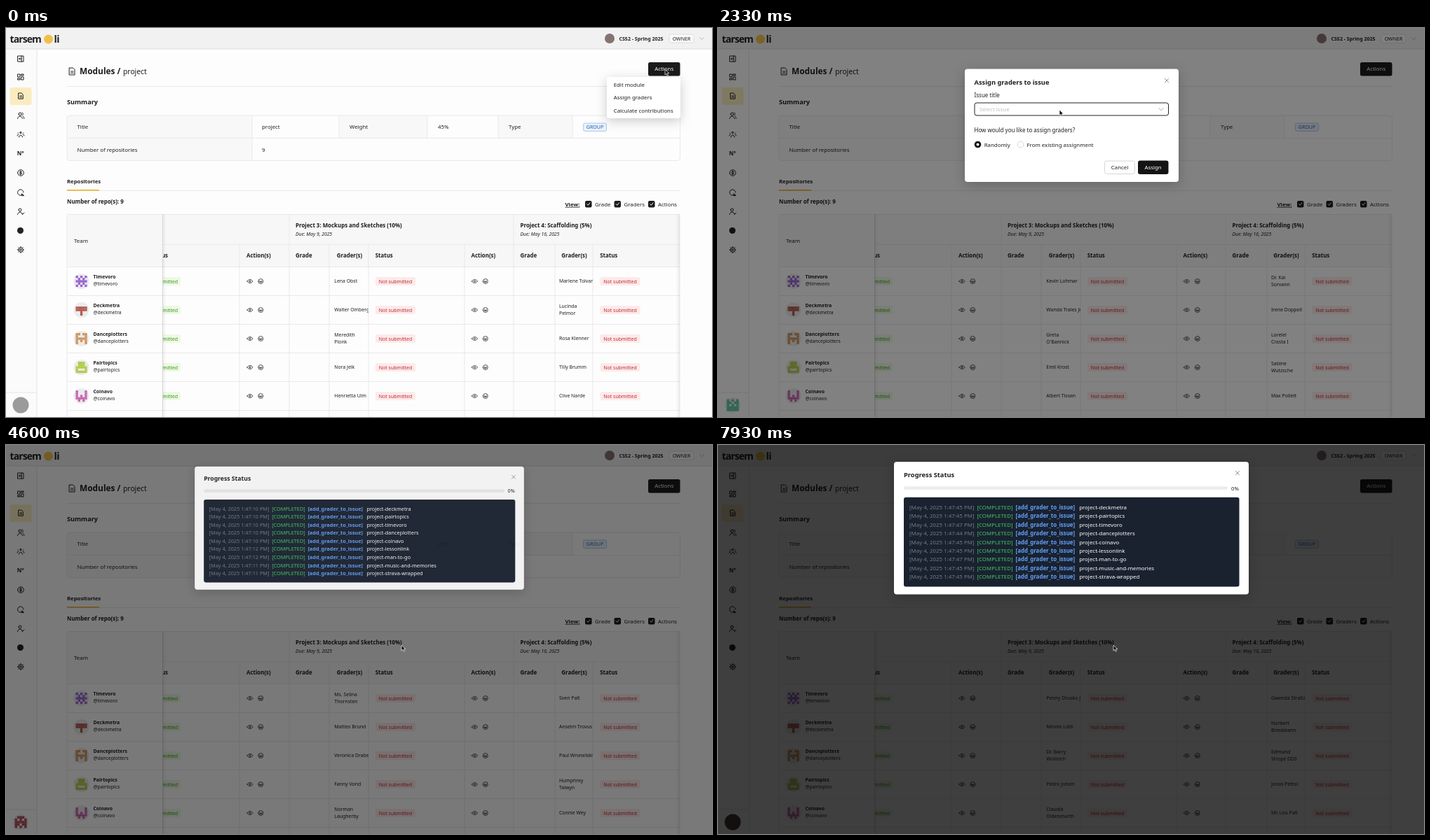
Animation of 1007x556 px, one loop 8000 ms. Source, as an HTML page:

```html
<!DOCTYPE html>
<html lang="en">
<head>
<meta charset="utf-8">
<title>Assign graders</title>
<style>
html, body { margin: 0; height: 100%; overflow: hidden; background: #fdfdfd; }
svg { display: block; width: 100vw; height: 100vh; font-family: "Noto Sans", "Open Sans", sans-serif; }
text { white-space: pre; }
.icon { fill: none; stroke: #1c1c1c; stroke-width: 1; stroke-linecap: round; stroke-linejoin: round; }
.thin .icon { stroke-width: .75; }
.card { filter: drop-shadow(0 4px 8px rgba(0,0,0,.2)); }
</style>
</head>
<body>
<svg id="stage" viewBox="0 0 1007 556"></svg>
<script>
const LOOP = 8000, INK = '#1f1f1f', LINE = '#e9e9e9';
const teams = [
  ['Timevoro', '#9a62d2', '52725'], ['Deckmetra', '#b4584f', '07711'],
  ['Danceplotters', '#d0955f', '64754'], ['Pairtopics', '#b1cd4b', '33747'],
  ['Coinavo', '#c964b4', '44572']
];
// Each set: five names for the left column, then five for the right one.
const nameSets = [
  [0, 'Lena Obst,Walter Omberg,Meredith|Plonk,Nora Jelk,Henrietta Ulm,Marlene Tolvar,Lucinda|Pelmor,Rosa Klenner,Tilly Brumm,Clive Narde'],
  [930, "Kevin Lohmar,Wanda Trales Jr.,Greta|O'Bannick,Emil Krost,Albert Tissen,Dr. Kai|Sorvann,Irene Doppell,Lorelei|Crasta I,Sabine|Wutzsche,Max Pollett"],
  [3530, 'Desmond|Hullings,Selina Doza|IV,Otto Ulmer,Yvonne Tavert,Ruby Hosper,Hugo Vayen,Jane Druhl,Victor Pelvin,Ursula Tovan,Gilbert|Lommer'],
  [4330, 'Ms. Selina|Thornsten,Matteo Brund,Veronica Drabey,Fanny Vond,Norman|Laugherby,Sven Palt,Anselm Trovus,Paul Wronelski,Humphrey|Talwyn,Connie Wey'],
  [4930, 'Penny Drusko Jr.,Minnie Lotti,Dr. Barry|Wolinich,Pedro Jolsen,Claudia|Oldenmarth,Gwenda Straltz,Norbert|Briedelann,Edmund|Strope DDS,Jonas Pettol,Mr. Lou Palt']
];
const avatars = [[0, '#9b9b9b'], [930, '#7fc98a', '37757'], [2130, '#5fc3a4', '56577'],
  [3530, '#5a78c8', '25725'], [4330, '#b0505c', '35765'], [4930, '#4a3d3c']];
// project, earlier second, start second, final second, finish time
const jobs = [
  ['deckmetra', 10, 44, 45, 5400], ['pairtopics', 10, 44, 45, 5870], ['timevoro', 10, 43, 47, 6670],
  ['danceplotters', 10, 44, 44, 5130], ['coinavo', 10, 44, 45, 5870], ['lessonlink', 12, 44, 45, 5600],
  ['man-to-go', 12, 44, 47, 6670], ['music-and-memories', 11, 44, 45, 5530], ['strava-wrapped', 11, 44, 45, 5670]
];
const rowY = i => 362 + 41 * i;

const text = (x, y, s, size = 7.85, weight = 400, more = '') =>
  `<text x="${x}" y="${y}" dy=".36em" font-size="${size}" font-weight="${weight}" fill="${INK}" ${more}>${s}</text>`;
const rect = (x, y, w, h, fill, more = '') =>
  `<rect x="${x}" y="${y}" width="${w}" height="${h}" fill="${fill}" ${more}/>`;
const hline = (x1, x2, y, c = LINE) => rect(x1, y - .5, x2 - x1, 1, c);
const vline = (x, y1, y2, c = LINE) => rect(x - .5, y1, 1, y2 - y1, c);
const icon = (x, y, d, more = '') => `<path class="icon" transform="translate(${x} ${y})" d="${d}" ${more}/>`;
const circle = (x, y, r, fill) => `<circle cx="${x}" cy="${y}" r="${r}" fill="${fill}"/>`;
const ring = r => `M${-r} 0a${r} ${r} 0 1 0 ${2 * r} 0a${r} ${r} 0 1 0 ${-2 * r} 0`;
const mid = 'text-anchor="middle"';

// Mirrored 5 by 5 pattern; each octal digit holds the left three cells of a row.
function identicon(x, y, color, rows, cell = 3.2) {
  let out = circle(x, y, 11, '#ebebeb');
  [...rows].forEach((d, r) => {
    for (let c = 0; c < 5; c++)
      if (d >> (2 - Math.min(c, 4 - c)) & 1)
        out += rect(x + (c - 2.5) * cell, y + (r - 2.5) * cell, cell + .1, cell + .1, color);
  });
  return out;
}

const doc = 'M-3.5 -5H1.5L4 -2.5V5H-3.5ZM-1.5 0H2M-1.5 2.3H2';
const person = 'M-4.5 4.5C-4 0 2 0 2.5 4.5M-3 -2a2 2 0 1 0 4 0a2 2 0 1 0 -4 0';

function frame() {
  let s = rect(0, 0, 1007, 556, '#fdfdfd') + rect(0, 31, 44, 525, '#fbfbfb') + vline(44, 30, 556, '#e4e4e4')
    + rect(0, 0, 1007, 30, '#f1f1f1') + hline(0, 1007, 30, '#dedede');
  s += text(5.5, 15.5, 'tarsem', 14, 900, 'letter-spacing="-.9"') + circle(60.5, 16, 6.5, '#f0c04a')
    + text(68.5, 15.5, 'li', 14, 900, 'letter-spacing="-.6"');
  s += circle(861, 15, 7, '#85736f') + text(874.5, 15, 'CS52 - Spring 2025', 7.05, 600)
    + rect(946, 9, 35, 12, '#fafafa', 'rx="2" stroke="#d6d6d6" stroke-width=".8"')
    + text(963.5, 15, 'OWNER', 7.05, 400, mid) + icon(992.5, 15, 'M-3 -1.5L0 1.8L3 -1.5', 'style="stroke:#bbb"');
  // sidebar
  s += rect(5.5, 85, 31, 25, '#faecc0', 'rx="3"');
  s += icon(21, 44, 'M-4 -4H4V4H-4ZM1.2 -4V4M-2.4 0H.6M-1 -1.4L-2.4 0L-1 1.4')
    + icon(21, 70, 'M-4 -4H-1V0H-4ZM1 -4H4V-2H1ZM1 0H4V4H1ZM-4 2H-1V4H-4Z')
    + icon(21, 97, 'M-3 -4H1L3.3 -1.7V4.2H-3ZM-1.3 0H1.6M-1.3 2H1.6')
    + icon(21, 125, person + 'M2 -4C4 -3.5 4 -.8 2 -.3M3 1C4.3 1.5 4.8 3 4.8 4.5')
    + icon(21, 152, 'M-1.2 -2.5a1.2 1.2 0 1 0 2.4 0a1.2 1.2 0 1 0 -2.4 0M-2.5 4C-2 0 2 0 2.5 4M-4.8 2C-4.8 .5 -4 0 -3 0M4.8 2C4.8 .5 4 0 3 0M-4 -2.2V-1.8M4 -2.2V-1.8')
    + text(20.5, 179.5, 'Nº', 8, 800, mid)
    + icon(21, 207, ring(4.3) + 'M1.6 -1.4C.5 -2.6 -1.8 -2 -1.5 -.8C-1.2 .4 1.6 -.2 1.6 1.2C1.5 2.4 -.7 2.5 -1.7 1.4M0 -2.8V2.8')
    + icon(21, 235, 'M3 2.8A4.2 4.2 0 1 1 4 0M4.3 4.3L1.3 1.8V4.3Z')
    + icon(21, 262, person + 'M1.6 3.2L2.8 4.4L4.8 2') + circle(20.5, 289.5, 4.5, '#222')
    + icon(21, 317, ring(3.3) + ring(1.3) + 'M0 -4.6V-3.4M0 3.4V4.6M-4.6 0H-3.4M3.4 0H4.6M-3.2 -3.2L-2.4 -2.4M3.2 3.2L2.4 2.4M3.2 -3.2L2.4 -2.4M-3.2 3.2L-2.4 2.4')
    + hline(0, 44, 521, '#e6e6e6');
  // title and summary
  s += icon(94, 62, doc) + text(105, 62, 'Modules /', 11.9, 600) + text(167, 62, 'project', 10.3)
    + hline(87, 961, 83.5) + rect(916, 49, 45.5, 19.5, '#1b1b1b', 'rx="2.5"')
    + text(938.7, 58.5, 'Actions', 7.85, 400, mid + ' style="fill:#fff"') + text(87, 106, 'Summary', 9.2, 600);
  for (const [x, y, w] of [[87, 125, 264], [475, 125, 126], [702, 125, 106], [87, 157, 264]]) s += rect(x, y, w, 32, '#f8f8f8');
  s += rect(87, 125, 874.5, 64.5, 'none', `rx="4" stroke="${LINE}"`) + hline(87, 961, 157.5) + vline(351, 125, 189);
  for (const x of [475, 601, 702, 808]) s += vline(x, 125, 157);
  s += text(101.5, 141.5, 'Title') + text(365, 141.5, 'project', 7.85, 500) + text(490, 141.5, 'Weight')
    + text(616, 141.5, '45%', 7.85, 500) + text(717, 141.5, 'Type') + text(101.5, 174, 'Number of repositories')
    + text(365, 174, '9', 7.85, 500) + rect(823.5, 136, 33, 11.5, '#e8f1fc', 'rx="2" stroke="#a3bfe0" stroke-width=".8"')
    + text(840, 141.7, 'GROUP', 7.05, 500, mid + ' style="fill:#2c62ab"');
  // tab and view switches
  s += text(87, 219, 'Repositories', 7.75, 600) + hline(87, 961, 232.5) + rect(87, 231, 46, 1.6, '#ecb22e')
    + text(87, 248, 'Number of repo(s): 9', 7.9, 600)
    + text(797.5, 252, 'View:', 7.85, 600, 'text-decoration="underline"');
  for (const [x, label] of [[826, 'Grade'], [867.5, 'Graders'], [916, 'Actions']])
    s += rect(x, 247, 9.5, 9.5, '#1b1b1b', 'rx="2"')
      + icon(x + 4.7, 251.7, 'M-2 0L-.5 1.6L2.2 -1.8', 'style="stroke:#fff"') + text(x + 14, 252, label);
  // table
  s += rect(87, 266, 874, 75, '#f7f7f7', 'rx="4"') + hline(224, 961, 309.5) + hline(87, 961, 266.5)
    + vline(87, 268, 556) + vline(961, 268, 556);
  for (let i = 0; i < 6; i++) s += hline(87, 961, 341.5 + 41 * i);
  for (const x of [404, 724]) s += vline(x, 266, 556);
  for (const x of [333, 461, 517, 654, 783, 837]) s += vline(x, 309, 556);
  s += text(97, 304, 'Team', 7.85, 500);
  for (const [x, title, due] of [[413, 'Project 3: Mockups and Sketches (10%)', 'May 9'], [733.5, 'Project 4: Scaffolding (5%)', 'May 16']])
    s += text(x, 282, title, 7.9, 600) + text(x, 295, `Due: ${due}, 2025`, 6.8, 500, 'font-style="italic"')
      + text(x, 325.5, 'Grade', 7.9, 600) + text(x + 58.8, 325.5, 'Grader(s)', 7.9, 600) + text(x + 113.7, 325.5, 'Status', 7.9, 600);
  s += text(343, 325.5, 'Action(s)', 7.9, 600) + text(663.5, 325.5, 'Action(s)', 7.9, 600);
  let cut = text(231, 325.5, 'Status', 7.9, 600, 'text-anchor="end"');
  let actions = '';
  teams.forEach(([name, color, rows], i) => {
    const y = rowY(i);
    s += identicon(107.5, y, color, rows) + text(124.5, y - 6, name, 6.85, 600) + text(124.5, y + 4, '@' + name.toLowerCase(), 6.8);
    cut += rect(205, y - 6, 44, 12, '#edf9e3', 'rx="2"') + text(245, y, 'Submitted', 7, 400, 'text-anchor="end" style="fill:#3d9420"');
    for (const x of [527, 847.5])
      s += rect(x, y - 6, 57, 12, '#fdeaea', 'rx="2"') + text(x + 28.5, y, 'Not submitted', 7, 400, mid + ' style="fill:#c02a36"');
    for (const x of [348, 668.5])
      actions += icon(x, y, 'M-4 0C-2 -3.4 2 -3.4 4 0C2 3.4 -2 3.4 -4 0Z' + ring(1.2))
        + icon(x + 15.3, y, ring(3.5) + 'M-1.8 .8C-1 2.2 1 2.2 1.8 .8ZM-1.3 -1V-.8M1.3 -1V-.8');
  });
  s += `<g class="thin">${actions}</g><g clip-path="url(#scrolled)">${cut}</g><g id="names"></g>`
    + rect(223, 266, 6, 290, 'url(#edge)') + rect(-961, 266, 6, 290, 'url(#edge)', 'transform="scale(-1 1)"') + vline(223.5, 266, 556, '#d4d4d4');
  return s;
}

const closeX = (x, y) => icon(x, y, 'M-2.6 -2.6L2.6 2.6M2.6 -2.6L-2.6 2.6', 'style="stroke:#888;stroke-width:.9"');
const menu = rect(857, 70, 105, 59, '#fff', 'rx="4" class="card"')
  + ['Edit module', 'Assign graders', 'Calculate contributions'].map((s, i) => text(866.7, 81 + 18.4 * i, s)).join('');
const form = rect(352, 58.5, 305, 161.5, '#fff', 'rx="4" class="card"') + closeX(640, 75)
  + text(365.5, 77.5, 'Assign graders to issue', 9.3, 600) + text(365.5, 96, 'Issue title', 8, 500)
  + rect(366, 107, 276.5, 18, '#fff', 'id="field" rx="3"') + text(373, 116, 'Select issue', 7.85, 400, 'style="fill:#bdbdbd"')
  + icon(632, 116, 'M-3 -1.5L0 1.8L3 -1.5', 'style="stroke:#aaa"')
  + text(365.5, 146, 'How would you like to assign graders?', 8, 500)
  + circle(370.5, 166.5, 4.8, '#161616') + circle(370.5, 166.5, 1.9, '#fff') + text(379.7, 167, 'Randomly')
  + '<circle cx="431.5" cy="166.5" r="4.4" fill="#fff" stroke="#d6d6d6"/>' + text(440.5, 167, 'From existing assignment')
  + rect(551.5, 190, 43, 18.5, '#fff', 'rx="3" stroke="#d6d6d6"') + text(573, 199, 'Cancel', 7.85, 400, mid)
  + rect(599, 189.5, 43.5, 19.5, '#141414', 'rx="3"') + text(620.5, 199, 'Assign', 7.85, 400, mid + ' style="fill:#fff"');
const progress = rect(251, 24, 506, 189.5, '#fff', 'rx="4" class="card"') + closeX(741, 40)
  + text(265, 42.5, 'Progress Status', 9.3, 600) + rect(265, 59.3, 462, 4.4, '#ececec', 'rx="2.2"') + text(732, 61.7, '0%')
  + rect(265, 74.8, 478.5, 127.6, '#1a2230', 'rx="3"') + '<g id="log"></g>';

const $ = id => document.getElementById(id);
$('stage').innerHTML = `<defs><linearGradient id="edge"><stop stop-opacity=".06"/><stop offset="1" stop-opacity="0"/></linearGradient>
<clipPath id="scrolled"><rect x="224" y="266" width="400" height="290"/></clipPath>
<clipPath id="left"><rect x="462" y="342" width="55" height="214"/></clipPath>
<clipPath id="right"><rect x="783" y="342" width="54" height="214"/></clipPath></defs>
${frame()}<g id="avatar"></g><g id="menu">${menu}</g><rect id="mask" width="1007" height="556"/>
<g id="form">${form}</g><g id="progress">${progress}</g>
<path id="cursor" d="M0 0V8L1.9 6.3L3.2 9.2L4.6 8.6L3.3 5.7H5.8Z" fill="#111" stroke="#fff" stroke-width=".7"/>`;

const clamp = v => Math.max(0, Math.min(1, v));
const smooth = p => p * p * (3 - 2 * p);
const easeOut = p => 1 - (1 - p) ** 4;
const span = (t, from, len) => clamp((t - from) / len);
function along(t, keys, ease = p => p) {
  let v = keys[0][1];
  for (let i = 1; i < keys.length; i++)
    v += (keys[i][1] - keys[i - 1][1]) * ease(span(t, keys[i - 1][0], keys[i][0] - keys[i - 1][0]));
  return v;
}
const current = (t, list) => list.filter(e => e[0] <= t).pop();

const shown = {};
function put(id, html) {
  if (shown[id] !== html) $(id).innerHTML = shown[id] = html;
}
function zoom(id, cx, cy, p) {
  const k = .2 + .8 * p;
  $(id).setAttribute('transform', `translate(${cx} ${cy}) scale(${k}) translate(${-cx} ${-cy})`);
  $(id).setAttribute('opacity', p);
}
function names(list) {
  const half = (from, x, clip) => `<g clip-path="url(#${clip})">` + list.slice(from, from + 5).map((name, i) =>
    name.split('|').map((s, k, parts) =>
      text(x, rowY(i) + (parts.length > 1 ? k * 10 - 5 : 0), s, 6.9)).join('')).join('') + '</g>';
  return half(0, 468.3, 'left') + half(5, 789, 'right');
}
function log(t) {
  const part = (s, color, more = '') => `<tspan fill="${color}" ${more}>${s}</tspan>`;
  return jobs.map(([name, old, start, end, at], i) => {
    const fresh = t >= 4930, done = !fresh || t >= at, sec = !fresh ? old : done ? end : start;
    return text(273, 89 + 12.43 * i,
      part(`[May 4, 2025 1:47:${sec} PM]`, '#737b88')
      + (done ? part('[COMPLETED]', '#3fc765', 'dx="4"') : part('[EXECUTING]', '#e5a23a', 'dx="4"'))
      + part('[add_grader_to_issue]', '#62a0f8', 'dx="4" font-weight="700"')
      + part('project-' + name, '#fff', 'dx="6"'), 7.9);
  }).join('');
}

const cursorX = [[70, 940], [670, 905], [1800, 905], [2130, 487], [2800, 487], [3200, 618], [3600, 618], [4000, 564]];
const cursorY = [[70, 59], [670, 102], [1800, 102], [2130, 117], [2800, 117], [3200, 198], [3600, 198], [4000, 286]];
const DIM = .49;
const maskKeys = [[4420, DIM], [4600, .52], [4820, .75]];

function draw(t) {
  put('names', names(current(t, nameSets)[1].split(',')));
  const [, color, rows] = current(t, avatars);
  put('avatar', rows ? identicon(21, 539, color, rows, 3.4) : circle(21, 539, 11.5, color));
  $('menu').setAttribute('opacity', 1 - span(t, 930, 200));
  const open = span(t, 1530, 400);
  $('mask').setAttribute('opacity', t < 4420 ? DIM * open * (2 - open) : along(t, maskKeys));
  zoom('form', 504, 139.5, easeOut(open) * (1 - span(t, 4270, 180)));
  zoom('progress', 504, 118.7, easeOut(span(t, 4420, 400)));
  $('field').setAttribute('stroke', t > 2080 && t < 3200 ? '#222' : '#d6d6d6');
  put('log', log(t));
  $('cursor').setAttribute('transform', `translate(${along(t, cursorX, smooth)} ${along(t, cursorY, smooth)})`);
}
function tick() {
  draw(performance.now() % LOOP);
  requestAnimationFrame(tick);
}
tick();
</script>
</body>
</html>
```
